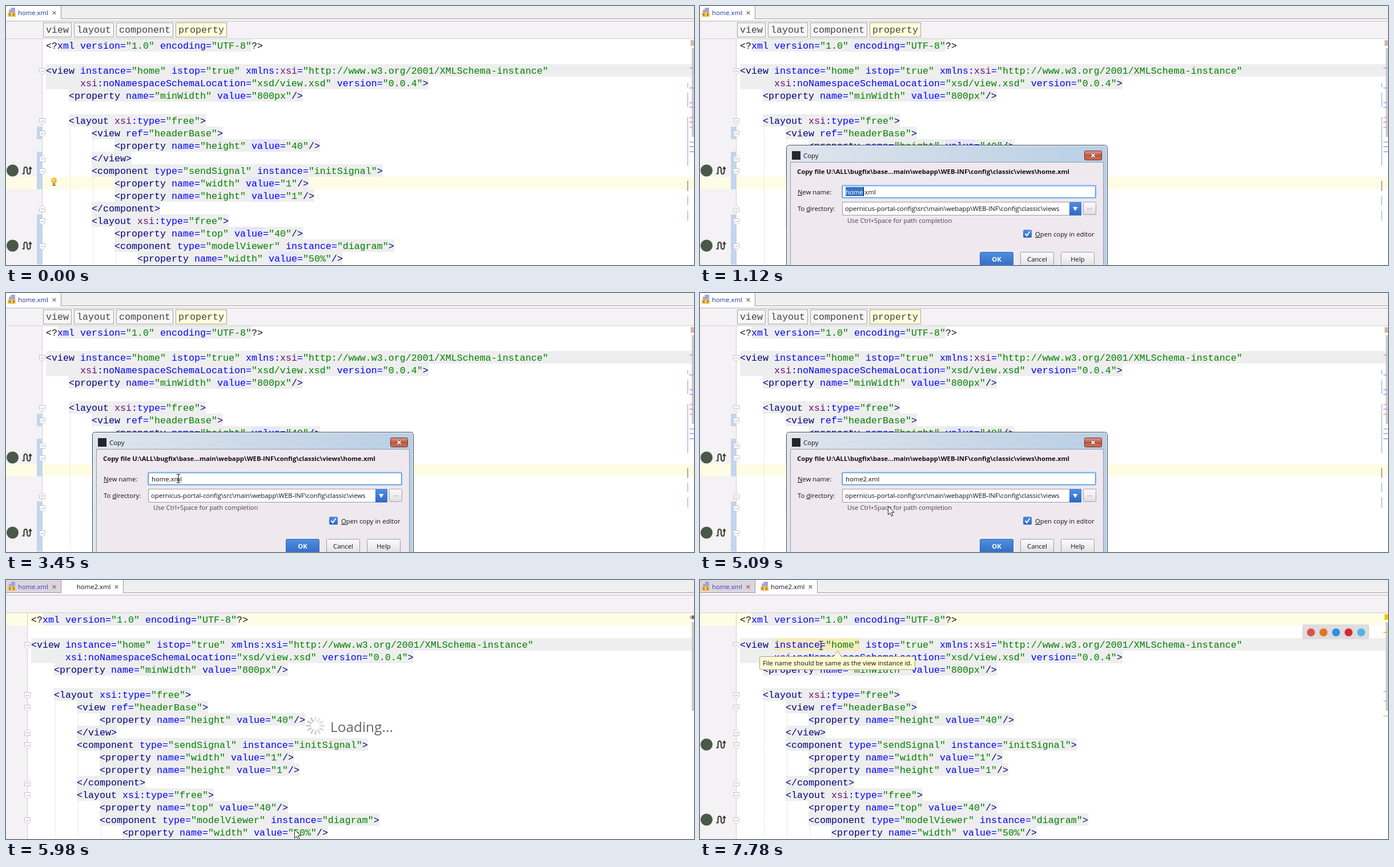
Write an HTML page that moves like this. It is 1205 by 455 pixels and loops after 8000 ms.

```html
<!DOCTYPE html>
<html lang="en">
<head>
<meta charset="utf-8">
<title>Copy view file</title>
<style>
  html, body { margin: 0; width: 100%; height: 100%; overflow: hidden; background: #fff; }
  svg { display: block; width: 1205px; height: 455px; }
  text { white-space: pre; font: 11.3px "Open Sans", "Noto Sans", sans-serif; fill: #111; }
  .code, .crumb { font: 16.664px "Liberation Mono", monospace; }
  .crumb { fill: #444; }
  .tag { fill: #000080; }
  .attr { fill: #0000ff; }
  .val { fill: #008000; }
  .ns { fill: #660e7a; }
  .raw .ns { fill: #0000ff; }
  .plain { fill: #111; }
</style>
</head>
<body>
<svg id="stage" viewBox="0 0 1205 455"></svg>
<script>
const LOOP = 8000, STEP = 22, TOP = 58;
const NS = "http://www.w3.org/2000/svg";
const stage = document.getElementById("stage");

function add(parent, tag, attrs = {}, content) {
  const el = document.createElementNS(NS, tag);
  for (const k in attrs) el.setAttribute(k, attrs[k]);
  if (content !== undefined) el.textContent = content;
  parent.appendChild(el);
  return el;
}
const group = (p, x = 0, y = 0) => add(p, "g", { transform: `translate(${x} ${y})` });
const box = (p, x, y, w, h, fill, more) => add(p, "rect", { x, y, width: w, height: h, fill, ...more });
const frame = (p, x, y, w, h, fill, stroke, rx = 0) =>
  box(p, x + .5, y + .5, w - 1, h - 1, fill, { stroke, rx });
const label = (p, x, y, s, more) => add(p, "text", { x, y, ...more }, s);
const path = (p, d, more) => add(p, "path", { d, fill: "none", ...more });
const lineTop = i => TOP + i * STEP;

// things shown only in given time ranges
const timed = [];
const during = (el, ...ranges) => { timed.push({ el, ranges }); return el; };

const defs = add(stage, "defs");
function gradient(id, stops, flat) {
  const g = add(defs, "linearGradient", { id, x1: 0, y1: 0, x2: flat ? 1 : 0, y2: flat ? 0 : 1 });
  stops.forEach((c, i) => add(g, "stop", { offset: i / (stops.length - 1), "stop-color": c }));
  return `url(#${id})`;
}
const BLUE = gradient("blue", ["#4f8fe0", "#2f69c4"]);
const GREY = gradient("grey", ["#fdfcfd", "#e0dde0"]);
const RED = gradient("red", ["#e0a08c", "#c4553c", "#d07058"]);
const PALE = gradient("pale", ["#e6edf5", "#cfdae6"]);
const AERO = gradient("aero", ["#dfe6ee", "#cbd9e8", "#b9cfe6"], true);

const LINES = [
  [0, '<?xml version="1.0" encoding="UTF-8"?>'],
  [0, ''],
  [0, '<view instance="home" istop="true" xmlns:xsi="http://www.w3.org/2001/XMLSchema-instance"'],
  [6, 'xsi:noNamespaceSchemaLocation="xsd/view.xsd" version="0.0.4">'],
  [4, '<property name="minWidth" value="800px"/>'],
  [0, ''],
  [4, '<layout xsi:type="free">'],
  [8, '<view ref="headerBase">'],
  [12, '<property name="height" value="40"/>'],
  [8, '</view>'],
  [8, '<component type="sendSignal" instance="initSignal">'],
  [12, '<property name="width" value="1"/>'],
  [12, '<property name="height" value="1"/>'],
  [8, '</component>'],
  [8, '<layout xsi:type="free">'],
  [12, '<property name="top" value="40"/>'],
  [12, '<component type="modelViewer" instance="diagram">'],
  [16, '<property name="width" value="50%"/>']
];
const FOLDS = [2, 6, 7, 10, 14, 16], FOLD_ENDS = [9, 13];
const GUIDES = [[112, 7, 18], [152, 8, 9], [152, 11, 13], [152, 15, 18], [192, 17, 18]];

function codeLine(p, x, y, s) {
  const t = label(p, x, y, "", { class: "code" });
  let prev = "";
  for (const tok of s.match(/"[^"]*"|<[?\/]?|\?>|\/?>|\w+|[:=]|\s+/g) || []) {
    let cls = "attr";
    if (tok[0] === '"') cls = "val";
    else if (tok.includes("?")) cls = "plain";
    else if (/[<>]/.test(tok) || /^<\/?$/.test(prev)) cls = "tag";
    else if (tok === "xsi") cls = "ns";
    add(t, "tspan", { class: cls }, tok);
    prev = tok;
  }
}

function codeBack(p, marked) {
  LINES.forEach(([indent, s], i) => {
    if (!s) return;
    const y = lineTop(i), x = 70 + indent * 10, end = x + s.length * 10;
    if (i === 0) box(p, 90, y, 340, STEP, "#eeeeee");
    else if (i === 2) box(p, 70, y, 1180, STEP, "#eeeeee");
    else if (i === 3) box(p, 70, y, end - 70, STEP, "#eeeeee");
    else box(p, x, y, end - x, STEP, "#eeeeee");
    const at = s.indexOf("value=");
    if (marked && at > 0) box(p, x + at * 10, y, 50, STEP, "#e6e6fb");
  });
  for (const [x, a, b] of GUIDES)
    path(p, `M${x + .5} ${lineTop(a)}V${lineTop(b)}`, { stroke: "#d8d8d8", "stroke-dasharray": "1 1" });
}
function codeText(p) {
  LINES.forEach(([indent, s], i) => codeLine(p, 70 + indent * 10, lineTop(i) + 17, s));
}

function foldLine(p) {
  path(p, `M63.5 ${TOP}V455`, { stroke: "#d2d0d2" });
  const mark = (i, dir) => {
    const g = group(p, 63.5, lineTop(i) + 12.5);
    path(g, `M-5 ${-5 * dir}H5V${2 * dir}L0 ${6 * dir}L-5 ${2 * dir}Z`, { fill: "#fff", stroke: "#c2c0c2" });
    path(g, "M-2.5 0H2.5", { stroke: "#a8a6a8" });
  };
  FOLDS.forEach(i => mark(i, 1));
  FOLD_ENDS.forEach(i => mark(i, -1));
}

function gutterIcons(p) {
  for (const y of [289, 421]) {
    const g = group(p, 0, y);
    add(g, "circle", { cx: 11.5, cy: 0, r: 10.5, fill: "#4a5847" });
    path(g, "M28.5 5.5H31.5V-2Q31.5-6 34.3-6Q37-6 37-2V2Q37 6 39.8 6Q42.5 6 42.5 2V-4",
      { stroke: "#34382f", "stroke-width": 2 });
    path(g, "M39 -2.5L42.5 -7.5L46 -2.5Z", { fill: "#34382f" });
  }
}

function fileIcon(p, x) {
  const g = group(p, x, 3);
  path(g, "M6 0H13V9H2V4Z", { fill: "#a3a6cf" });
  path(g, "M6 0V4H2Z", { fill: "#d4d5ea" });
  box(g, 0, 8, 14, 8, "#f4c764");
  path(g, "M5 9.5L2.5 12L5 14.5M9 9.5L11.5 12L9 14.5", { stroke: "#8a5a1c", "stroke-width": 1.2 });
}
const cross = (p, x, y, r, stroke, w) =>
  path(p, `M${x - r} ${y - r}L${x + r} ${y + r}M${x + r} ${y - r}L${x - r} ${y + r}`, { stroke, "stroke-width": w });

function topBars(p) {
  box(p, 0, 0, 1205, 22, "#f0eff0");
  box(p, 0, 22, 1205, 4, "#fff");
  box(p, 0, 22, 1205, 1, "#9a999a");
  box(p, 0, 26, 1205, 1, "#b4b3b4");
  box(p, 0, 27, 1205, 30, "#f4f2f4");
  box(p, 0, 57, 1205, 1, "#d0ced0");
}

// right-hand strip: [y, colour]
function strip(p, marks) {
  box(p, 1201, 74, 4, 156, "#cccbcc");
  for (const [y, c] of marks) box(p, 1197, y, 8, 2, c);
}

// first editor
const first = during(group(stage), [0, 5980]);
box(first, 0, 0, 1205, 455, "#fff");
box(first, 0, TOP, 63, 397, "#f4f2f4");
box(first, 0, lineTop(11), 1205, STEP, "#fffce5");
for (const [a, b] of [[7, 8], [9, 12], [14, 18]])
  box(first, 54, lineTop(a), 9, (b - a) * STEP, "#c3d5ef");
topBars(first);
box(first, 0, 0, 96, 26, "#fff");
box(first, 96, 0, 1, 23, "#9a999a");
fileIcon(first, 3);
label(first, 21, 16, "home.xml", { style: "fill:#1a2f9c" });
cross(first, 84.5, 12, 2.8, "#777", 1.4);
[["view", 65, 50], ["layout", 119, 70], ["component", 193, 100], ["property", 297, 90]].forEach(([s, x, w], i) => {
  frame(first, x, 29, w, 26, i === 3 ? "#ffffdb" : "#f7f6f7", "#a3a2a3");
  label(first, x + 5, 47, s, { class: "crumb" });
});
codeBack(first, true);
codeText(first);
foldLine(first);
gutterIcons(first);
const violet = "#c9a4ee", tan = "#dcb9ab";
strip(first, [[108, violet], [143, violet], [169, violet], [177, violet], [195, tan], [203, violet],
  [212, tan], [238, tan], [246, violet], [255, violet]]);
box(first, 1199, 60, 6, 10, "#d9b6a6");
for (const [y, h, c] of [[135, 8], [152, 25], [195, 86], [307, 18, "#a9a9a9"], [333, 17], [359, 18]])
  box(first, 1193, y, 2, h, c || "#b9cff0");

const bulb = during(group(first, 84, 308), [0, 470]);
add(bulb, "circle", { cx: 0, cy: -1.5, r: 5, fill: "#f3b63f" });
add(bulb, "circle", { cx: -1, cy: -2.5, r: 2.2, fill: "#fbdc8c" });
box(bulb, -2.5, 3, 5, 2, "#d39a34");
box(bulb, -2.5, 5.5, 5, 2.5, "#777");

// copy dialog
const dialog = during(group(stage), [1120, 5980]);
path(dialog, "M151.5 460V250Q151.5 244.5 157 244.5H708Q713.5 244.5 713.5 250V460Z", { fill: AERO, stroke: "#3c444c" });
path(dialog, "M152.5 460V250Q152.5 245.5 157 245.5H708Q712.5 245.5 712.5 250V460", { stroke: "#f2f7fb" });
frame(dialog, 158, 274, 549, 190, "#efe9ef", "#8f9ba8");
box(dialog, 161, 255, 15, 15, "#26262a");
label(dialog, 181, 267, "Copy");

function closeButton(fill, edge, range) {
  const g = during(group(dialog), range);
  frame(g, 673, 254, 31, 17, fill, edge, 2);
  cross(g, 688.5, 262.5, 3.2, "#4d4a52", 3.4);
  cross(g, 688.5, 262.5, 3, "#fff", 2);
}
closeButton(RED, "#5e2f2a", [1120, 5650]);
closeButton(PALE, "#8593a3", [5650, 5980]);

label(dialog, 170, 295, "Copy file U:\\ALL\\bugfix\\base...main\\webapp\\WEB-INF\\config\\classic\\views\\home.xml",
  { style: "font-weight:bold" });

function keyed(x, y, s, key) {
  const t = label(dialog, x, y, "");
  const i = s.indexOf(key);
  add(t, "tspan", {}, s.slice(0, i));
  add(t, "tspan", { "text-decoration": "underline" }, key);
  add(t, "tspan", {}, s.slice(i + 1));
}
keyed(171, 331, "New name:", "N");
keyed(171, 360, "To directory:", "d");

frame(dialog, 249, 315, 445, 23, "#fff", "#9c9aa0");
const focus = during(group(dialog), [1120, 5650]);
box(focus, 249, 315.5, 444, 21.5, "#fff", { stroke: "#a9cdf2", "stroke-width": 3, rx: 2 });
box(focus, 249.5, 316, 443, 20.5, "#fff", { stroke: "#4d8fd6", "stroke-width": 1.2, rx: 1 });

const picked = during(group(dialog), [1120, 2830]);
box(picked, 255, 318, 32, 16, "#3875c8");
const pickedName = label(picked, 255, 331, "");
add(pickedName, "tspan", { fill: "#fff" }, "home");
add(pickedName, "tspan", {}, ".xml");
during(label(dialog, 255, 331, "home.xml"), [2830, 4390]);
during(label(dialog, 255, 331, "home2.xml"), [4390, 5980]);

const caret = (p, x, y, w, h, ...ranges) => during(box(p, x, y, w, h, "#000"), ...ranges);
caret(dialog, 286, 318, 1, 16, [1120, 1580], [2130, 2680]);
caret(dialog, 289, 318, 1, 16, [2910, 3450], [3920, 4390]);
caret(dialog, 292, 318, 1, 16, [4390, 4930], [5490, 5650]);

frame(dialog, 249, 344, 419, 24, "#fff", "#9c9aa0");
label(dialog, 254, 360, "opernicus-portal-config\\src\\main\\webapp\\WEB-INF\\config\\classic\\views");
box(dialog, 647, 344, 21, 24, BLUE);
path(dialog, "M653 353H661.4L657.2 360Z", { fill: "#fff" });
frame(dialog, 671, 344, 23, 23, GREY, "#a3a1a6", 1);
for (const x of [679, 682, 685]) box(dialog, x, 356, 1, 1, "#444");
label(dialog, 258, 381, "Use Ctrl+Space for path completion", { style: "font-size:11.1px;fill:#444" });
box(dialog, 566, 393, 15, 14, BLUE, { rx: 2 });
path(dialog, "M569.5 400L572.5 403.5L577.5 396", { stroke: "#fff", "stroke-width": 2 });
keyed(587, 405, "Open copy in editor", "O");

during(box(dialog, 488.5, 430.5, 61.5, 30, "#86b5ee", { rx: 4 }), [5650, 5980]);
frame(dialog, 490, 432, 59, 28, BLUE, "#3567b4", 2);
label(dialog, 519.5, 449, "OK", { "text-anchor": "middle", style: "font-weight:bold;fill:#fff" });
[["Cancel", 561], ["Help", 632]].forEach(([s, x]) => {
  frame(dialog, x, 432, 59, 28, GREY, "#9d9ba0", 2);
  label(dialog, x + 29.5, 449, s, { "text-anchor": "middle" });
});

// second editor: plain while loading, then with wider gutter and analysis
const second = during(group(stage), [5980, LOOP]);
box(second, 0, 0, 1205, 455, "#fff");
function editorBody(dx, ready, range) {
  const g = during(group(second), range);
  box(g, 0, TOP, 63 + dx, 397, "#f4f2f4");
  box(g, 0, lineTop(0), 1205, STEP, "#fffce5");
  const inner = group(g, dx);
  if (!ready) inner.setAttribute("class", "raw");
  codeBack(inner, false);
  if (ready) during(box(inner, 130, lineTop(2), 150, STEP, "#f6ebbc"), [6630, LOOP]);
  codeText(inner);
  foldLine(inner);
  if (ready) gutterIcons(inner);
}
editorBody(-26, false, [5980, 6360]);
editorBody(0, true, [6360, LOOP]);
topBars(second);
box(second, 0, 0, 96, 22, "#dad6dc");
box(second, 97, 0, 108, 26, "#fff");
for (const x of [96, 205]) box(second, x, 0, 1, 23, "#9a999a");
fileIcon(second, 3);
fileIcon(during(group(second), [6360, LOOP]), 106);
label(second, 21, 16, "home.xml", { style: "fill:#3a3acb" });
label(second, 124, 16, "home2.xml");
cross(second, 84.5, 12, 2.8, "#a8626e", 1.4);
cross(second, 193.5, 12, 2.8, "#777", 1.4);
strip(second, []);
const marks = during(group(second), [6630, LOOP]);
for (const [y, c] of [[91, "#e3c21c"], [195, "#c4c4c4"], [212, "#c4c4c4"], [238, "#dccfa4"]])
  box(marks, 1197, y, 8, 2, c);
const eye = during(group(second), [5980, 6790]);
path(eye, "M1197.5 65.5Q1203 59 1208.5 65.5Q1203 72 1197.5 65.5Z", { fill: "#efe6e4", stroke: "#9a7f7c" });
add(eye, "circle", { cx: 1203, cy: 65.5, r: 2.5, fill: "#7a5854" });
during(box(second, 1199, 60, 6, 10, "#f2c500"), [6790, LOOP]);
caret(second, 70, 59, 2, 20, [6630, 6870], [7140, 7620]);

const loading = during(group(second), [5980, 6060]);
for (let i = 0; i < 12; i++)
  path(loading, "M0 -9V-15", {
    transform: `translate(542 256) rotate(${i * 30})`, stroke: `rgb(${Array(3).fill(228 - i * 3)})`,
    "stroke-width": 3, "stroke-linecap": "round"
  });
label(loading, 568, 267, "Loading...", { style: "font-size:24.4px;fill:#666" });

const tools = during(group(second), [6790, LOOP]);
box(tools, 1055, 78, 117, 26, "#dedcde", { rx: 3 });
["#d9534a", "#df7426", "#3090de", "#d52b30", "#4fb5e6"].forEach((fill, i) =>
  add(tools, "circle", { cx: 1070 + i * 22, cy: 92, r: 7, fill }));

const tip = during(group(second), [7780, LOOP]);
path(tip, "M106.5 134.5H234L241 124.5L248 134.5H374Q376.5 134.5 376.5 137V155Q376.5 157.5 374 157.5H107Q104.5 157.5 104.5 155V137Q104.5 134.5 106.5 134.5Z",
  { fill: "#fdfad2", stroke: "#a5a395" });
label(tip, 110, 150, "File name should be same as the view instance id.");

// mouse: [time, x, y, shape]
const arrow = group(stage), beam = group(stage);
path(arrow, "M.5 .5V15.5L4 12.2L6.6 18L9 17L6.4 11.3H11.2Z", { fill: "#fff", stroke: "#222" });
path(beam, "M-3.5 -7.5H-1L0 -6.5L1 -7.5H3.5M0 -6.5V6.5M-3.5 7.5H-1L0 6.5L1 7.5H3.5M-2 2.5H2", { stroke: "#222", "stroke-width": 1.2 });
const POINTER = [
  [0, 0, 0], [1580, 22, 215, arrow], [1660, 92, 246, arrow], [1740, 176, 280, arrow], [1820, 238, 303, arrow],
  [1900, 266, 313, arrow], [2130, 273, 324, arrow], [2290, 281, 325, arrow], [2370, 289, 332, beam],
  [2830, 290, 330, beam], [3140, 302, 326, beam], [3920, 309, 325, beam], [4000, 312, 325, beam],
  [4930, 316, 332, beam], [5010, 322, 352, arrow], [5090, 329, 374, arrow], [5250, 518, 430, arrow],
  [5330, 499, 436, arrow], [5650, 505, 438, arrow], [5730, 0, 0], [5980, 505, 438, arrow],
  [6360, 505, 446, beam], [6420, 495, 440, beam], [6630, 441, 402, beam], [6700, 409, 371, beam],
  [6790, 372, 334, beam], [6870, 341, 303, beam], [6950, 313, 271, beam], [7030, 289, 250, beam],
  [7140, 272, 234, beam], [7300, 262, 196, beam], [7380, 251, 156, beam], [7460, 242, 128, beam],
  [7620, 219, 117, beam], [7780, 212, 115, beam]
];

function draw(now) {
  const t = now % LOOP;
  for (const { el, ranges } of timed)
    el.style.display = ranges.some(([a, b]) => t >= a && t < b) ? "" : "none";
  const [, x, y, shape] = POINTER.filter(p => p[0] <= t).pop();
  for (const el of [arrow, beam]) el.style.display = el === shape ? "" : "none";
  if (shape) shape.setAttribute("transform", `translate(${x} ${y})`);
}
const start = performance.now();
function tick() {
  draw(performance.now() - start);
  requestAnimationFrame(tick);
}
tick();
</script>
</body>
</html>
```
